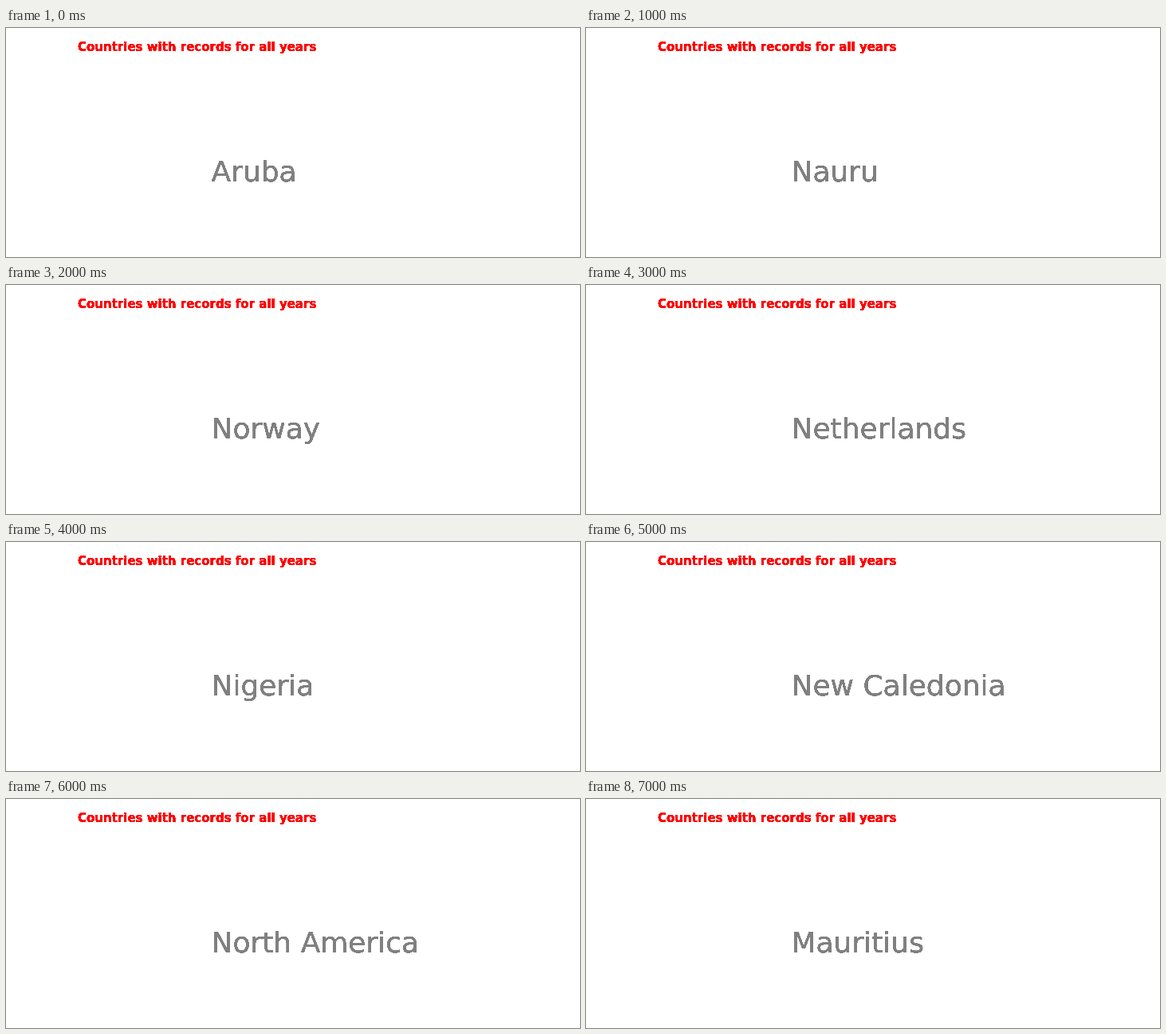
An HTML page for the animation above (8 s loop, 720 by 288 pixels).

```html
<!DOCTYPE html>
<html lang="en">
<head>
<meta charset="utf-8">
<title>Countries with records for all years</title>
<style>
  html, body {
    margin: 0;
    width: 100%;
    height: 100%;
    overflow: hidden;
    background: #fff;
  }
  svg {
    position: absolute;
  }
  div {
    position: absolute;
    white-space: pre;
    line-height: normal;
    font-family: "DejaVu Sans", sans-serif;
    filter: url(#crisp);
  }
  #title {
    left: 90px;
    top: 15px;
    font-size: 15px;
    font-weight: bold;
    color: #f00;
  }
  #place {
    left: 257.5px;
    top: 160px;
    font-size: 36px;
    color: #808080;
  }
</style>
</head>
<body>
<!-- Raises soft edge pixels to full strength, giving hard glyph edges. -->
<svg width="0" height="0">
  <filter id="crisp" color-interpolation-filters="sRGB">
    <feComponentTransfer>
      <feFuncA type="linear" slope="6" intercept="-0.6"/>
    </feComponentTransfer>
  </filter>
</svg>
<div id="title">Countries with records for all years</div>
<div id="place">Aruba</div>
<script>
  const STEP = 1000;
  const places = [
    "Aruba", "Nauru", "Norway", "Netherlands",
    "Nigeria", "New Caledonia", "North America", "Mauritius"
  ];
  const label = document.getElementById("place");
  const start = performance.now();

  function draw() {
    const elapsed = Math.max(0, performance.now() - start);
    const name = places[Math.floor(elapsed / STEP) % places.length];
    if (label.textContent !== name) label.textContent = name;
    requestAnimationFrame(draw);
  }
  draw();
</script>
</body>
</html>
```
